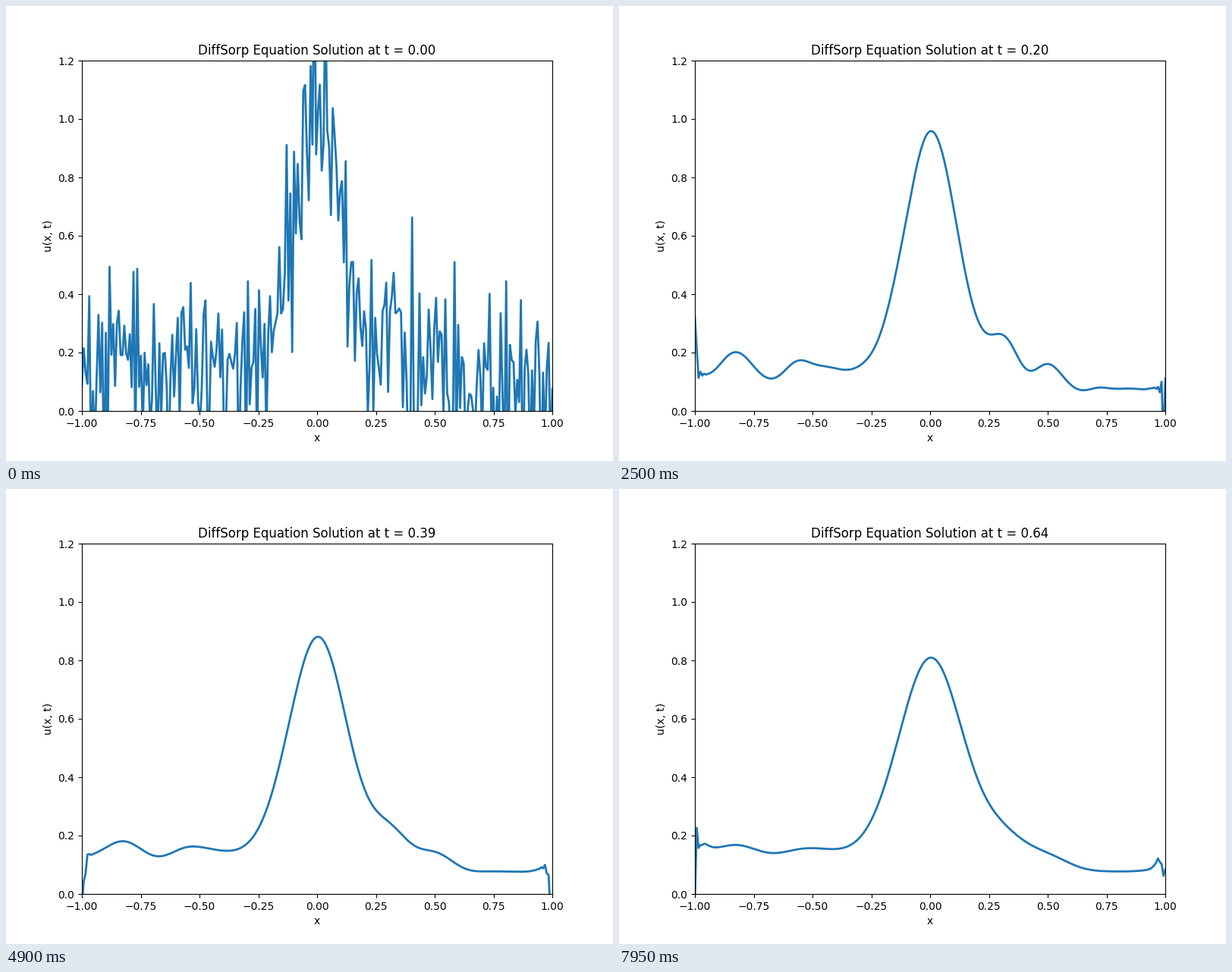
A matplotlib script that plays this animation: 800x600 px, repeating every 8000 ms.

```python
import numpy as np
import matplotlib.pyplot as plt
from matplotlib.animation import FuncAnimation

FRAMES, INTERVAL = 160, 50
DT = 0.004            # model time per frame
RATE = 0.44           # D * dt / dx^2 of the explicit diffusion step
LEVEL = 0.085         # resting concentration
ROUGHNESS = 0.2       # spread of the starting noise
WALL_NOISE = 0.18
N = 256

# Shapes that survive the noise at the start: centre, height, width
BUMPS = [
    (0, 0.99, 0.104), (-0.085, -0.17, 0.012),
    (-0.835, 0.17, 0.04), (-0.765, 0.07, 0.02), (-0.57, 0.16, 0.025),
    (-0.45, 0.09, 0.045), (-0.3, 0.05, 0.045),
    (0.245, 0.05, 0.02), (0.32, 0.3, 0.033), (0.465, 0.15, 0.013),
    (0.515, 0.25, 0.02), (0.6, 0.13, 0.012), (0.715, 0.18, 0.012),
    (0.84, 0.04, 0.035), (0.62, -0.06, 0.2),
]

rng = np.random.default_rng(12)
x = np.linspace(-1, 1, N)


def diffuse(u):
    v = u.copy()
    v[1:-1] += RATE * np.diff(u, 2)
    return v


def fine_noise():
    """White noise without its slow part, so that it fades within a few steps."""
    noise = rng.normal(0, ROUGHNESS, N)
    slow = noise
    for _ in range(3):
        slow = diffuse(slow)
    return noise - slow


def start():
    u = LEVEL + fine_noise()
    for centre, height, width in BUMPS:
        u += height * np.exp(-0.5 * ((x - centre) / width) ** 2)
    return u


def march(u):
    """One diffusion step per frame; the walls jitter around nearby values."""
    states = [u]
    while len(states) < FRAMES:
        u = diffuse(u)
        u[[0, -1]] = u[[10, -11]] + rng.normal(0.01, WALL_NOISE, 2)
        states.append(u)
    return states


states = march(start())

fig, ax = plt.subplots(figsize=(8, 6), dpi=100)
line, = ax.plot(x, states[0], lw=2)
ax.set_xlim(-1, 1)
ax.set_ylim(0, 1.2)
ax.set_xlabel("x")
ax.set_ylabel("u(x, t)")
title = ax.set_title("")


def draw(n):
    line.set_ydata(states[n])
    title.set_text(f"DiffSorp Equation Solution at t = {n * DT:.2f}")
    return line, title


anim = FuncAnimation(fig, draw, frames=FRAMES, interval=INTERVAL,
                     repeat=True, repeat_delay=0, blit=False)
plt.show()
```
